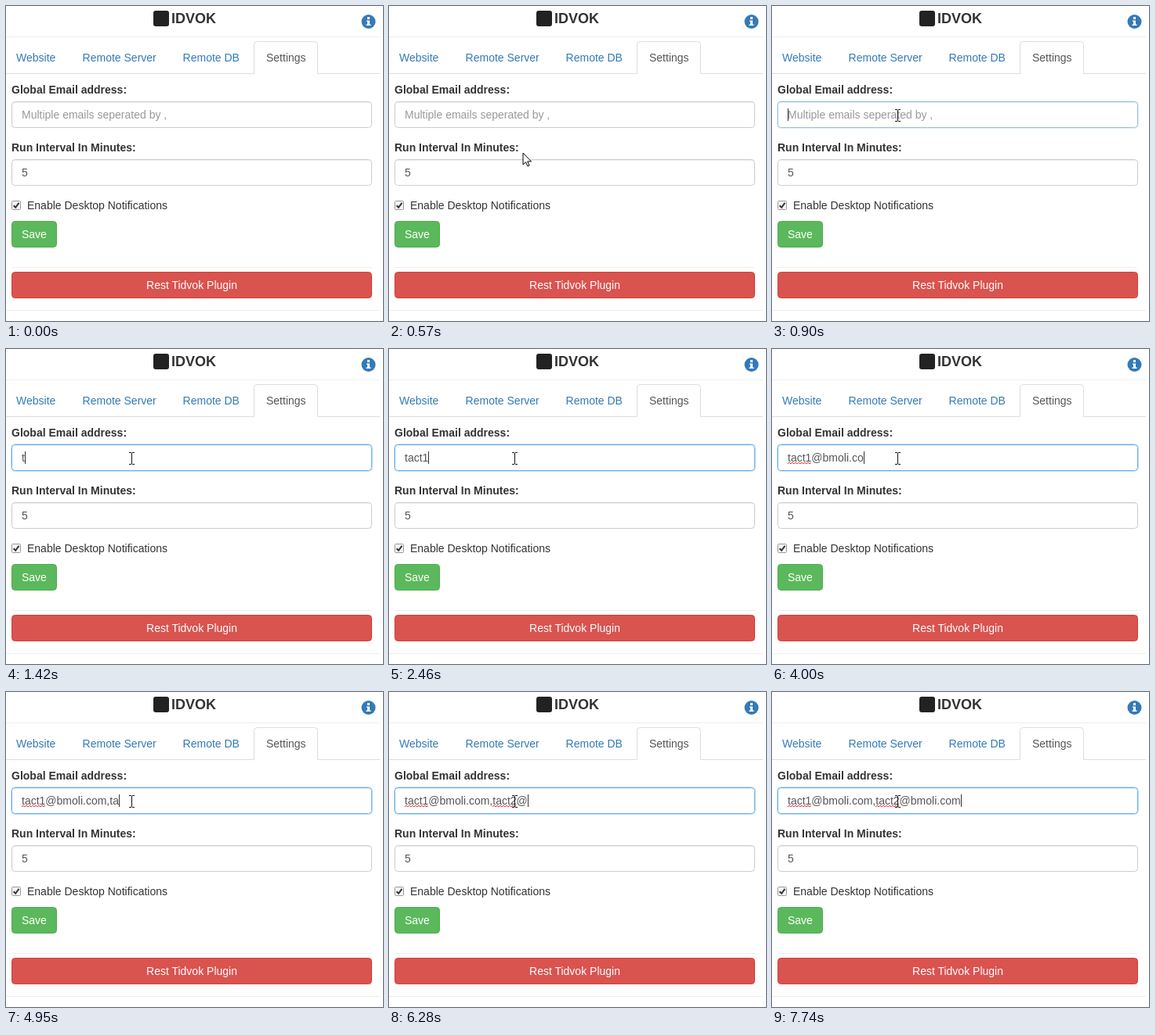
Recreate the animation shown at these times as an HTML page. Size 481 px wide and 403 px high, loop 8000 ms.

```html
<!DOCTYPE html>
<html lang="en">
<head>
<meta charset="utf-8">
<title>Plugin settings</title>
<style>
  html, body { margin: 0; width: 100%; height: 100%; overflow: hidden; background: #fff; }
  svg { display: block; font: 14px "Liberation Sans", Arial, sans-serif; fill: #333; }
  .bold { font-weight: bold; }
  .link { fill: #337ab7; }
  .value { fill: #555; }
  .field { fill: #fff; stroke: #ccc; }
  .rule { stroke: #eee; }
  .squiggle { fill: none; stroke: #e33; }
  .button { fill: #fff; }
</style>
</head>
<body>
<svg width="481" height="403" viewBox="0 0 481 403">
  <rect x="188" y="6" width="20" height="20" rx="3" fill="#222"/>
  <text class="bold" x="211" y="22" font-size="18">IDVOK</text>
  <circle cx="462.5" cy="20" r="9" fill="#337ab7"/>
  <path d="M461 14h3v3h-3zM460 18.500h4v5h1.500v1.500h-6v-1.500h1.500v-3.500h-1z" fill="#fff"/>
  <path class="rule" d="M0 39.500H477M7 334.500H467M0 389.500H477"/>

  <path d="M0 86.500H316.500V49.500q0-4 4-4H393.500q4 0 4 4V86.500H477" fill="none" stroke="#ddd"/>
  <text class="link" x="13" y="71">Website</text>
  <text class="link" x="97.600" y="71">Remote Server</text>
  <text class="link" x="225.600" y="71">Remote DB</text>
  <text class="value" x="332" y="71">Settings</text>

  <text class="bold" x="7" y="112">Global Email address:</text>
  <rect id="glow" x="6.500" y="121.500" width="461" height="35" rx="5" fill="none" stroke="#66afe9"/>
  <rect id="email" class="field" x="7.500" y="122.500" width="459" height="33" rx="4"/>
  <path d="M10 123.500H464" stroke="#000" opacity=".06"/>
  <text id="hint" x="20" y="144" fill="#999">Multiple emails seperated by ,</text>
  <text id="typed" class="value" x="20" y="144"></text>
  <path id="wave1" class="squiggle"/>
  <path id="wave2" class="squiggle"/>
  <rect id="caret" y="131" width="1" height="16" fill="#333"/>

  <text class="bold" x="7" y="186">Run Interval In Minutes:</text>
  <rect class="field" x="7.500" y="196.500" width="459" height="33" rx="4"/>
  <path d="M10 197.500H464" stroke="#000" opacity=".06"/>
  <text class="value" x="20" y="218">5</text>

  <rect x="7.500" y="249.500" width="11" height="11" rx="1" fill="#f4f4f4" stroke="#999"/>
  <path d="M9.700 255.200l2.500 2.600 4.300-6" fill="none" stroke="#333" stroke-width="2"/>
  <text x="27" y="260">Enable Desktop Notifications</text>

  <rect x="7.500" y="275.500" width="57" height="33" rx="4" fill="#5cb85c" stroke="#4cae4c"/>
  <text class="button" x="20" y="297">Save</text>
  <rect x="7.500" y="340.500" width="459" height="33" rx="4" fill="#d9534f" stroke="#d43f3a"/>
  <text class="button" x="237" y="362" text-anchor="middle">Rest Tidvok Plugin</text>

  <g id="pointer">
    <path id="arrow" d="M0 0V15l3.500-3.300 2.400 5.300 2.200-1-2.400-5.100H10.500z" fill="#fff" stroke="#000"/>
    <path id="beam" d="M-3 -7.500H0M1 -7.500H4M-3 7.500H0M1 7.500H4M.5 -7V7" fill="none" stroke="#111"/>
  </g>
</svg>
<script>
const LOOP = 8000;
const MESSAGE = "tact1@bmoli.com,tact2@bmoli.com";
const KEY_TIMES = [
  1350, 1520, 1750, 1900, 2370, 2690, 3070, 3140, 3320, 3390, 3540, 3770, 3850, 4000, 4170, 4700,
  4870, 4950, 5190, 5330, 5800, 6200, 6740, 6890, 6990, 7090, 7180, 7350, 7500, 7660, 7740
];
const POINTER = { from: [205, 332], to: [160, 140], start: 260, end: 740, step: 80 };
const FOCUS = 820;

const $ = id => document.getElementById(id);
const show = (id, on) => $(id).setAttribute("visibility", on ? "visible" : "hidden");
const clamp = v => Math.min(1, Math.max(0, v));

function squiggle(x, width) {
  let d = `M${x} 146.800`;
  for (let i = 1; i * 2 <= width; i++) d += `L${x + i * 2} ${i % 2 ? 145.300 : 146.800}`;
  return d;
}
$("wave1").setAttribute("d", squiggle(20, 30));
$("wave2").setAttribute("d", squiggle(132, 30));

function drawPointer(t) {
  const { from, to, start, end, step } = POINTER;
  const stepped = start + Math.floor((t - start) / step) * step;
  const p = clamp((stepped - start) / (end - start));
  const eased = 1 - (1 - p) ** 2;
  const [x, y] = from.map((v, i) => Math.round(v + (to[i] - v) * eased));
  const overField = (y > 121 && y < 157) || (y > 195 && y < 231);
  $("pointer").setAttribute("transform", `translate(${x} ${y})`);
  show("arrow", t >= start && !overField);
  show("beam", t >= start && overField);
}

function drawField(t) {
  const focus = clamp(Math.floor((t - FOCUS) / 75) / 2);
  const mix = (a, b) => Math.round(a + (b - a) * focus);
  $("email").style.stroke = `rgb(${mix(204, 102)},${mix(204, 175)},${mix(204, 233)})`;
  $("glow").setAttribute("opacity", focus * 0.4);

  const count = KEY_TIMES.filter(k => k <= t).length;
  $("typed").textContent = MESSAGE.slice(0, count);
  show("hint", count === 0);
  const width = count ? $("typed").getComputedTextLength() : 0;
  $("caret").setAttribute("x", Math.round(20 + width));
  show("caret", t >= FOCUS);
  show("wave1", t >= 2690);
  show("wave2", t >= 6280);
}

const origin = performance.now();
function frame() {
  const t = (performance.now() - origin) % LOOP;
  drawField(t);
  drawPointer(t);
  requestAnimationFrame(frame);
}
frame();
</script>
</body>
</html>
```
